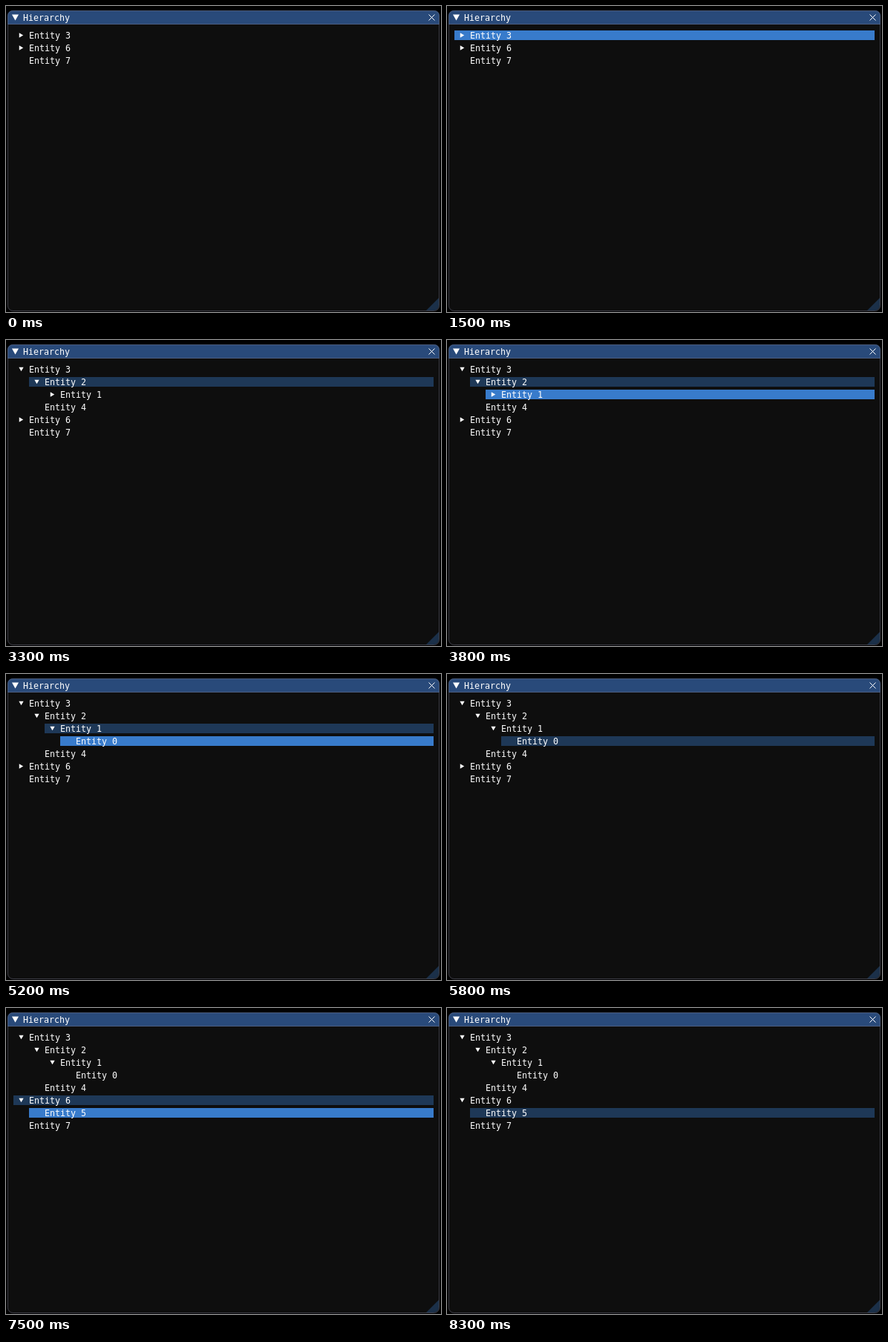
An HTML page that plays this animation: 586x413 px, repeating every 9.6 s.

```html
<!DOCTYPE html>
<html lang="en">
<head>
<meta charset="utf-8">
<title>Hierarchy</title>
<style>
html, body { margin: 0; width: 100%; height: 100%; overflow: hidden; background: #000; }
svg { display: block; }
text { font: 11.63px "DejaVu Sans Mono", monospace; fill: #fff; white-space: pre; }
</style>
</head>
<body>
<svg id="stage" width="586" height="413" viewBox="0 0 586 413">
  <rect width="586" height="413" fill="#000"/>
  <rect x="2" y="6" width="582" height="406" rx="7" fill="#0e0e0e"/>
  <path d="M2 25V13a7 7 0 0 1 7-7H577a7 7 0 0 1 7 7V25Z" fill="#294a7a"/>
  <path d="M566 411L583 394V404a7 7 0 0 1-7 7Z" fill="#1b3049"/>
  <g fill="none" stroke="#6e6e80" stroke-opacity=".5">
    <rect x="2.5" y="6.5" width="581" height="405" rx="7"/>
    <path d="M3 24.5H583"/>
  </g>
  <path id="fold" fill="#fff"/>
  <text x="23" y="20">Hierarchy</text>
  <path d="M569.5 11.5l8 8m0-8l-8 8" stroke="#fff" fill="none"/>
  <g id="tree"></g>
</svg>
<script>
const LOOP = 9600, TOP = 33, PITCH = 17, LEFT = 10, INDENT = 21, RIGHT = 576;
const COLORS = { selected: '#1e3857', hover: '#387bcb', press: '#4296fa' };

// Entities in tree order: id, depth, parent
const NODES = [
  [3, 0, null], [2, 1, 3], [1, 2, 2], [0, 3, 1],
  [4, 1, 3], [6, 0, null], [5, 1, 6], [7, 0, null]
];
const OPENED = { 3: 2100, 2: 3000, 1: 4700, 6: 6900 };

// Pointer steps: time, hovered id, selected id, button held
const STEPS = [
  [0, null, null], [1500, 3, null],
  [2100, 3, 3, true], [2200, 3, 3], [2700, 2, 3],
  [3000, 2, 2, true], [3100, 2, 2], [3300, null, 2],
  [3500, 4, 2], [3600, null, 2], [3800, 1, 2],
  [4700, 1, 1, true], [4800, 1, 1], [5100, null, 1], [5200, 0, 1],
  [5500, 0, 0, true], [5600, 0, 0], [5800, null, 0],
  [5900, 4, 0], [6000, 6, 0], [6100, 7, 0], [6400, 6, 0],
  [6900, 6, 6, true], [7000, 6, 6], [7400, null, 6], [7500, 5, 6],
  [7800, 5, 5, true], [7900, 5, 5], [8100, null, 5],
  [8200, 7, 5], [8300, null, 5]
];

const tree = document.getElementById('tree');

function add(parent, tag) {
  return parent.appendChild(document.createElementNS('http://www.w3.org/2000/svg', tag));
}

function set(el, attrs) {
  for (const key in attrs) el.setAttribute(key, attrs[key]);
}

function arrow(x, y, r, down) {
  const a = r * 0.75, b = r * 0.866;
  return down
    ? `M${x} ${y + a}L${x - b} ${y - a}H${x + b}Z`
    : `M${x + a} ${y}L${x - a} ${y + b}V${y - b}Z`;
}

const rows = NODES.map(([id, depth, parent]) => {
  const g = add(tree, 'g'), x = LEFT + depth * INDENT;
  const bar = add(g, 'rect'), mark = add(g, 'path'), label = add(g, 'text');
  set(bar, { x, y: 0, width: RIGHT - x, height: 13 });
  set(mark, { fill: '#fff' });
  set(label, { x: x + INDENT, y: 11 });
  label.textContent = 'Entity ' + id;
  return { id, parent, x, g, bar, mark };
});

function draw(t) {
  const [, hover, selected, held] = STEPS.findLast(s => s[0] <= t);
  const isOpen = id => t >= OPENED[id];
  let line = 0;
  for (const { id, parent, x, g, bar, mark } of rows) {
    const shown = parent === null || isOpen(parent);
    set(g, { display: shown ? 'inline' : 'none' });
    if (!shown) continue;
    set(g, { transform: `translate(0 ${TOP + PITCH * line++})` });
    const look = id === hover ? (held ? 'press' : 'hover') : id === selected ? 'selected' : '';
    set(bar, { fill: COLORS[look] || 'none' });
    if (id in OPENED) set(mark, { d: arrow(x + 10.5, 6.5, 3.64, isOpen(id)) });
  }
}

set(document.getElementById('fold'), { d: arrow(12.5, 15.5, 5.2, true) });

const start = performance.now();
function tick() {
  draw((performance.now() - start) % LOOP);
  requestAnimationFrame(tick);
}
tick();
</script>
</body>
</html>
```
